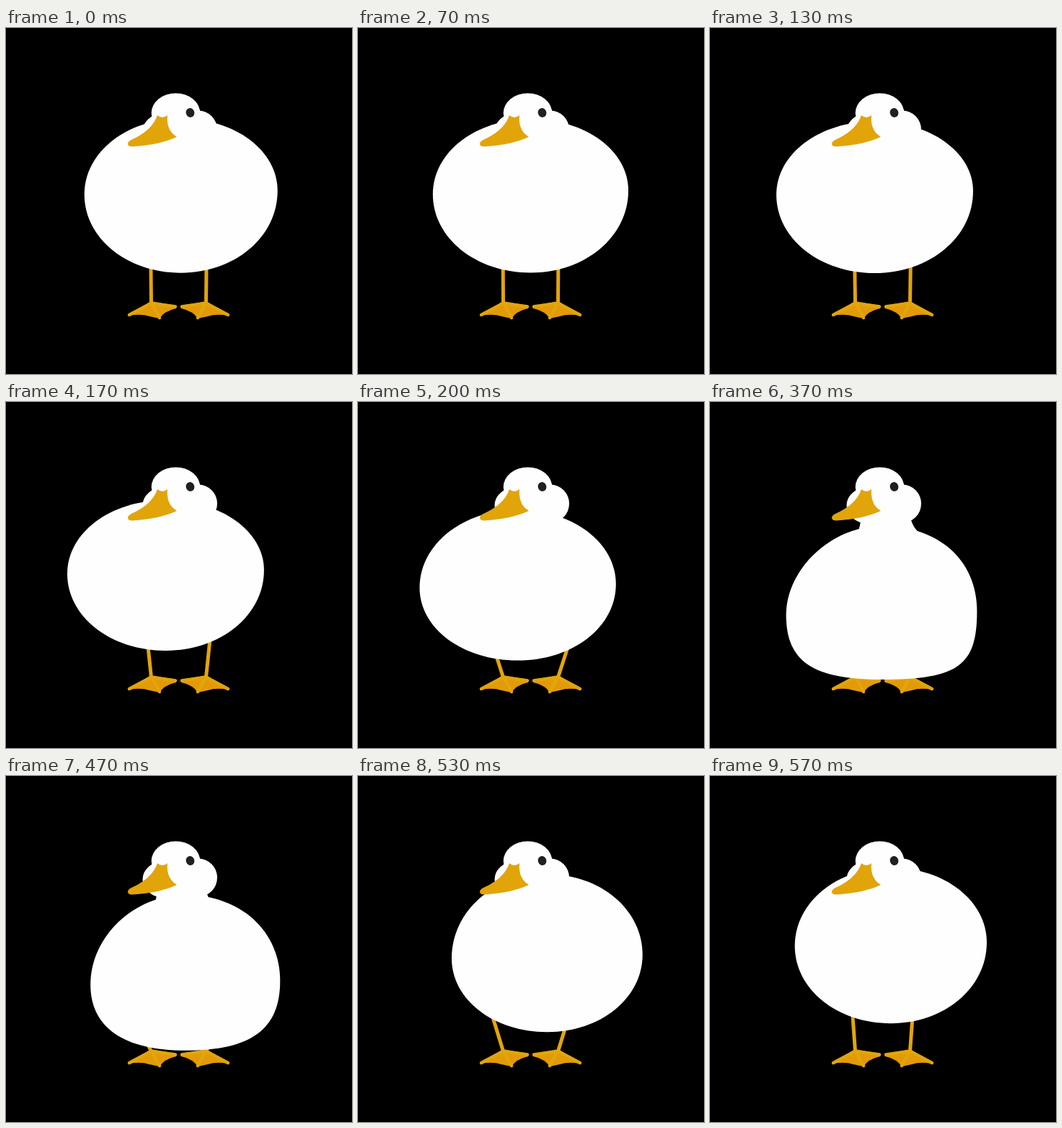
Write an HTML page that moves like this. It is 480 px wide and 480 px high and loops after 610 ms.

```html
<!DOCTYPE html>
<html lang="en">
<head>
<meta charset="utf-8">
<title>Bouncing duck</title>
<style>
  html, body { margin: 0; width: 100%; height: 100%; overflow: hidden; background: #000; }
  svg { display: block; width: 100vw; height: 100vh; }
</style>
</head>
<body>
<svg viewBox="0 0 480 480">
  <defs>
    <g id="foot">
      <path fill="#e29a08" d="M201 379 L170 399 Q188 396 199 400 L213 403 Q219 393 236 389 L236 385 Z"/>
      <path fill="none" stroke="#e2a50a" stroke-width="4.5" stroke-linecap="round" stroke-linejoin="round"
            d="M171 398 L201 382 L235 386.500 M202 382 L213 402"/>
    </g>
  </defs>
  <use href="#foot"/>
  <use href="#foot" transform="matrix(-1 0 0 1 479 0)"/>
  <path id="legs" fill="none" stroke="#e2a50a" stroke-width="5"/>
  <g fill="#fefefe">
    <path id="body"/>
    <path d="M209 140 V160 Q209 172 205 180 L296 185 Q282 178 278 160 V140 Z"/>
    <ellipse cx="217" cy="143.500" rx="27.500" ry="24.500"/>
    <ellipse cx="266.500" cy="141" rx="26.500" ry="26.500"/>
    <ellipse cx="235.500" cy="118" rx="33.800" ry="27.500"/>
  </g>
  <path fill="#e1a509" d="M210 121 Q217 127 224 121 Q222 142 237 151 Q214 162 175 164.500 Q169 164.500 169 160.500 Q169 157.500 174 155 Q203 142 210 121 Z"/>
  <ellipse cx="255.500" cy="117.500" rx="5.800" ry="6.500" fill="#231f20" transform="rotate(-20 255.500 117.500)"/>
</svg>
<script>
  const LOOP = 610, STEPS = 18;
  const body = document.getElementById('body');
  const legs = document.getElementById('legs');

  // Smooth bump around a step, wrapping over the loop; a higher power flattens its top
  function pulse(step, center, width, power = 2) {
    const gap = Math.abs(step - center);
    return Math.exp(-((Math.min(gap, STEPS - gap) / width) ** power));
  }

  function draw(step) {
    // The belly drops left, rests low, then swings up on the right
    const sink = pulse(step, 10.9, 5.04, 4.8);
    const lean = 25 * pulse(step, 15.5, 1.61) - 19.5 * pulse(step, 5.4, 2);
    const squash = sink ** 6;

    const x = 240.5 - 2.5 * sink + lean;
    const r = 134 + 2.5 * Math.sin(2 * Math.PI * step / STEPS);
    const top = 126 + 46 * sink - 0.25 * lean;
    const bottom = 339.5 + 45.5 * sink;
    const waist = 228 + 65 * sink;

    // Quarter curve of the belly; side is -1 or 1, end is its top or bottom
    function quarter(side, end, round, upward) {
      const k = round + 0.04 * side * squash;
      const edge = x + side * r, y = waist - 2.5 * side;
      const points = [[x, end], [x + side * r * k, end], [edge, y + (end - y) * k], [edge, y]];
      if (upward) points.reverse();
      return 'C' + points.slice(1).join(' ');
    }
    const upper = 0.56, lower = 0.56 + 0.2 * squash;
    body.setAttribute('d', `M${x} ${top}`
      + quarter(1, top, upper)
      + quarter(1, bottom, lower, true)
      + quarter(-1, bottom, lower)
      + quarter(-1, top, upper, true) + 'Z');

    const spread = Math.min(20, 1.4 * (bottom - 339.5));
    const hip = bottom - 40;
    legs.setAttribute('d',
      `M${201 - spread} ${hip} L201.500 382 M${278 + spread} ${hip} L277.500 382`);
  }

  function frame() {
    const t = performance.now() % LOOP;
    let step = STEPS - 1;
    while (Math.round(step * 10 / 3) * 10 > t) step--;
    draw(step);
    requestAnimationFrame(frame);
  }
  frame();
</script>
</body>
</html>
```
